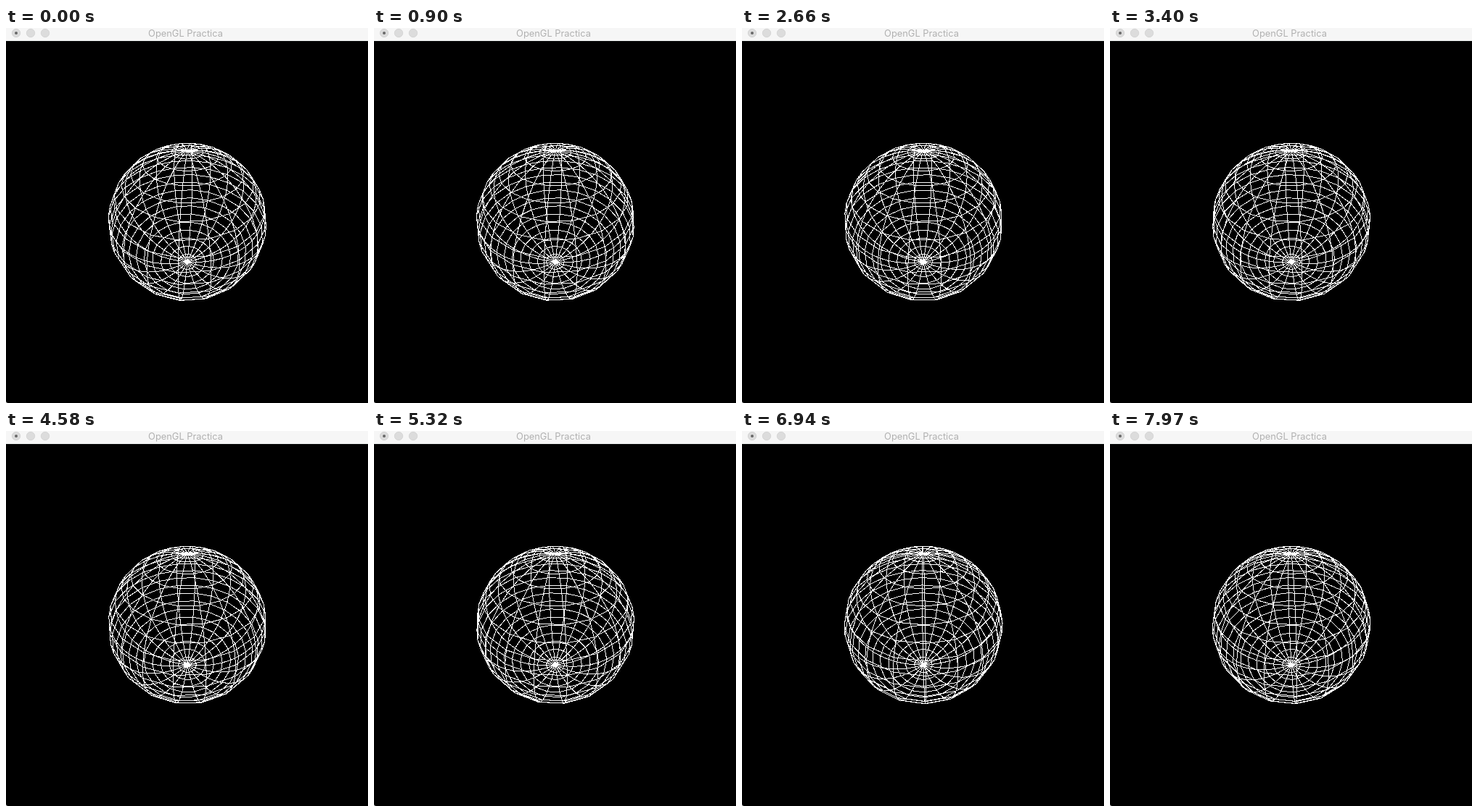
An HTML page that plays this animation: 499x518 px, repeating every 8000 ms.

```html
<!DOCTYPE html>
<html lang="en">
<head>
<meta charset="utf-8">
<title>OpenGL Practica</title>
<style>
  html, body { margin: 0; width: 100%; height: 100%; overflow: hidden; background: #000; }
  svg { display: block; width: 100%; height: 100%; }
  text { font: 12.85px Inter, Roboto, sans-serif; fill: #b1b1b1; text-anchor: middle; }
</style>
</head>
<body>
<svg viewBox="0 0 499 518">
  <rect width="499" height="518"/>
  <path id="wire" fill="none" stroke="#fff" stroke-linejoin="bevel" shape-rendering="crispEdges"/>
  <path d="M0 515Q0 518 3 518H0Z" fill="#ddd"/>
  <rect width="499" height="18" fill="#f6f6f6"/>
  <rect y="17" width="499" height="1" fill="#e9eeed"/>
  <g fill="#dcdcdc" stroke="#d1d1d1" stroke-width=".8">
    <circle cx="14" cy="7" r="5.7"/>
    <circle cx="34" cy="7" r="5.7"/>
    <circle cx="54" cy="7" r="5.7"/>
  </g>
  <circle cx="14" cy="7" r="2" fill="#686868"/>
  <text x="247.5" y="12">OpenGL Practica</text>
</svg>
<script>
const LOOP = 8000, STEP_MS = 147.5;
const START = -5, TURN = 2.815;      // degrees, degrees per step
const SLICES = 20, STACKS = 20;
const CX = 250, CY = 268, FOCAL = 250, DIST = 2.5, TILT = Math.SQRT1_2;
const RAD = Math.PI / 180;
const wire = document.getElementById('wire');

// Unit sphere point, tipped 45 degrees towards the camera
function project(lat, lon) {
  const r = Math.cos(lat), h = Math.sin(lat);
  const x = r * Math.sin(lon), n = r * Math.cos(lon);
  const y = TILT * (h - n), z = TILT * (h + n);
  const k = FOCAL / (DIST - z);
  return (CX + k * x).toFixed(2) + ' ' + (CY - k * y).toFixed(2);
}

function line(count, point) {
  return 'M' + Array.from({ length: count + 1 }, (_, i) => point(i)).join('L');
}

function sphere(spin) {
  const lat = i => (i / STACKS - 0.5) * Math.PI;
  const lon = j => spin + j / SLICES * 2 * Math.PI;
  let d = '';
  for (let i = 1; i < STACKS; i++) d += line(SLICES, j => project(lat(i), lon(j)));
  for (let j = 0; j < SLICES; j++) d += line(STACKS, i => project(lat(i), lon(j)));
  return d;
}

let shown = -1;
function render(t) {
  const step = Math.floor(t % LOOP / STEP_MS);
  if (step === shown) return;
  shown = step;
  wire.setAttribute('d', sphere((START + TURN * step) * RAD));
}

const t0 = performance.now();
function tick() {
  render(performance.now() - t0);
  requestAnimationFrame(tick);
}
tick();
</script>
</body>
</html>
```
